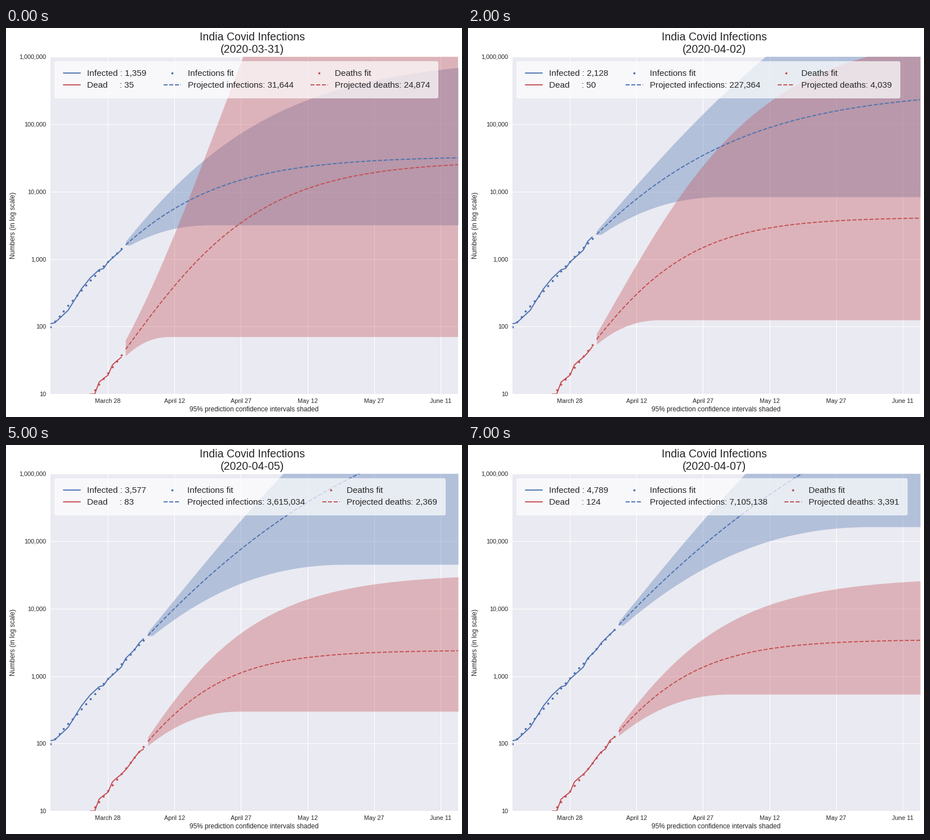
Animation, 810 px wide and 691 px high, one loop 8000 ms. Source, as a matplotlib script:

```python
import numpy as np
import matplotlib.pyplot as plt
from matplotlib.animation import FuncAnimation
from matplotlib.ticker import FuncFormatter, NullLocator

W, H = 810, 691
BLUE, RED, INK = "#4C72B0", "#C44E52", "#262626"
LAST_DAY = 92          # day 0 is March 15
MID_DAY = 43
FIRST_END = 16         # the first picture ends on March 31
FRAMES = 8
LW = 1.9

# Counts follow exponential growth between these (day, count) points.
INFECTED = [(0, 110), (1, 114), (4, 174), (7, 361), (9, 526), (11, 696),
            (12, 725), (13, 905), (16, 1359), (17, 1834), (19, 2470),
            (20, 3072), (21, 3577), (23, 4789)]
DEAD = [(8, 7), (9, 10), (10, 10), (11, 15), (13, 19), (14, 27), (16, 35),
        (17, 41), (19, 62), (20, 75), (21, 83), (22, 111), (23, 124)]

# Forecast values on the key steps; steps between are interpolated.
KEY_STEPS = [0, 1, 3, 4, 5, 7]
INFECTED_TOTAL = [31644, 115008, 449487, 1614405, 3615034, 7105138]
DEAD_TOTAL = [24874, 3982, 4096, 4015, 2369, 3391]
DEAD_TOP_MID = [5.91, 4.66, 4.11, 3.95, 3.64, 3.55]
DEAD_TOP_CEILING = [14.5, 7.1, 5.67, 5.26, 4.52, 4.47]

plt.rcParams.update({
    "font.family": "Liberation Sans",
    "text.color": INK, "axes.labelcolor": INK,
    "xtick.color": INK, "ytick.color": INK,
    "lines.solid_capstyle": "round",
})


def counts(points, days):
    t, n = np.array(points, float).T
    return np.rint(10 ** np.interp(days, t, np.log10(n))).astype(int)


def total(values, step):
    return int(round(10 ** np.interp(step, KEY_STEPS, np.log10(values))))


def growth(knots, ceiling, day):
    """Gompertz-like curve of log10 levels through the (day, level) knots."""
    t, level = np.array(knots, float).T
    poly = np.polyfit(t, np.log(np.log(ceiling / level)), len(t) - 1)
    level = ceiling * np.exp(-np.exp(np.polyval(poly, day)))
    return 10 ** np.minimum(level, 8)


def floor(day, start, low, plateau, end):
    """Lower bound that eases out into a plateau."""
    u = np.clip((day - start) / (end - start), 0, 1)
    return 10 ** (plateau - (plateau - low) * (1 - u) ** 2.2)


# Both rules return levels in log10: start, middle and ceiling of the
# projection, then (start, middle, ceiling) of the upper bound and
# (start, plateau, day reached) of the lower one.
def infection_rule(step, end_level):
    d = end_level - 4.5
    start = 3.212 + 0.078 * step
    mid = 4.172 + 0.484 * d - 0.0676 * d ** 2
    ceiling = end_level + 0.03 + 0.165 * d ** 2
    top_mid = 4.868 + 0.415 * d - 0.097 * d ** 2
    top_ceiling = top_mid + 1.135 + 9 * (top_mid - 4.868)
    plateau = 3.505 + 0.195 * step + 0.007 * step ** 2
    reached = 36.3 + 5.4 * step + 0.15 * step ** 2
    return (start, mid, ceiling, (start + 0.05, top_mid, top_ceiling),
            (start - 0.005, plateau, reached))


def death_rule(step, end_level):
    d = end_level - 3.375
    start = 1.664 + 0.0733 * step
    mid = 3.049 + 0.54 * d - 0.06 * d ** 2
    ceiling = end_level + 0.015 + 0.04 * d ** 2
    top_mid = np.interp(step, KEY_STEPS, DEAD_TOP_MID)
    top_ceiling = np.interp(step, KEY_STEPS, DEAD_TOP_CEILING)
    fade = np.exp(-step / 2)
    return (start, mid, ceiling, (start + 0.06 + 0.07 * fade, top_mid, top_ceiling),
            (start - 0.06 - 0.045 * fade, 1.845 + 0.1265 * step, 27 + 3.2 * step))


def draw_forecast(ax, step, color, first, first_level, rule, projected, lag):
    """Fit dots, dashed projection and confidence band of one series."""
    end = FIRST_END + step
    begin = end + 1
    end_level = np.log10(projected)
    start, mid, ceiling, top, bottom = rule(step, end_level)
    past = np.arange(first, end + 1)
    future = np.arange(begin, LAST_DAY + 1)

    upper = growth([(begin, top[0]), (MID_DAY, top[1])], top[2], future)
    lower = floor(future, begin + lag, *bottom)
    ax.fill_between(future, lower, upper, color=color, alpha=0.35, lw=0)

    knots = [(first, first_level), (begin, start), (MID_DAY, mid),
             (LAST_DAY - 1, end_level)]
    dots, = ax.plot(past, growth(knots, ceiling, past), ".", color=color, ms=7.6, mew=0)
    dashes, = ax.plot(future, growth(knots, ceiling, future), "--", color=color, lw=LW)
    return dots, dashes


def style_axes(ax, step):
    date = "03-31" if step == 0 else f"04-{step:02d}"
    ax.set_facecolor("#EAEAF2")
    ax.set_axisbelow(True)
    ax.grid(color="white", lw=1.08)
    for spine in ax.spines.values():
        spine.set_visible(False)
    ax.set_yscale("log")
    ax.set_xlim(0, LAST_DAY)
    ax.set_ylim(10, 1e6)
    ax.yaxis.set_minor_locator(NullLocator())
    ax.yaxis.set_major_formatter(FuncFormatter(lambda v, _: f"{v:,.0f}"))
    ax.set_xticks(range(13, 89, 15),
                  ["March 28", "April 12", "April 27", "May 12", "May 27", "June 11"])
    ax.tick_params(length=0, pad=7.6, labelsize=10.83)
    ax.set_xlabel("95% prediction confidence intervals shaded", size=11.92, labelpad=4.3)
    ax.set_ylabel("Numbers (in log scale)", size=11.92, labelpad=4.3)
    ax.set_title(f"India Covid Infections\n(2020-{date})", size=19.5, pad=6.5, x=0.4955)


fig = plt.figure(figsize=(W / 72, H / 72), dpi=72, facecolor="white")
ax = fig.add_axes([78.8 / W, 1 - 650.2 / H, 724.5 / W, 599.2 / H])


def update(step):
    ax.clear()
    style_axes(ax, step)
    days = np.arange(FIRST_END + step + 1)
    infected, dead = counts(INFECTED, days), counts(DEAD, days)
    infected_total = total(INFECTED_TOTAL, step)
    dead_total = total(DEAD_TOTAL, step)

    i_line, = ax.plot(days, infected, color=BLUE, lw=LW)
    d_line, = ax.plot(days, dead, color=RED, lw=LW)
    i_dots, i_dash = draw_forecast(ax, step, BLUE, 0, 1.995, infection_rule,
                                   infected_total, 1)
    d_dots, d_dash = draw_forecast(ax, step, RED, 10, 1.058, death_rule,
                                   dead_total, 0)
    entries = [
        (i_line, f"Infected : {infected[-1]:,}"),
        (d_line, f"Dead     : {dead[-1]:,}"),
        (i_dots, "Infections fit"),
        (i_dash, f"Projected infections: {infected_total:,}"),
        (d_dots, "Deaths fit"),
        (d_dash, f"Projected deaths: {dead_total:,}"),
    ]
    legend = ax.legend(*zip(*entries), loc="upper left", ncol=3, fontsize=15.24,
                       borderpad=1, frameon=True, facecolor="white", framealpha=0.7)
    legend.get_frame().set_linewidth(0)
    return []


anim = FuncAnimation(fig, update, frames=FRAMES, interval=1000,
                     repeat=True, repeat_delay=0, blit=False)
plt.show()
```
